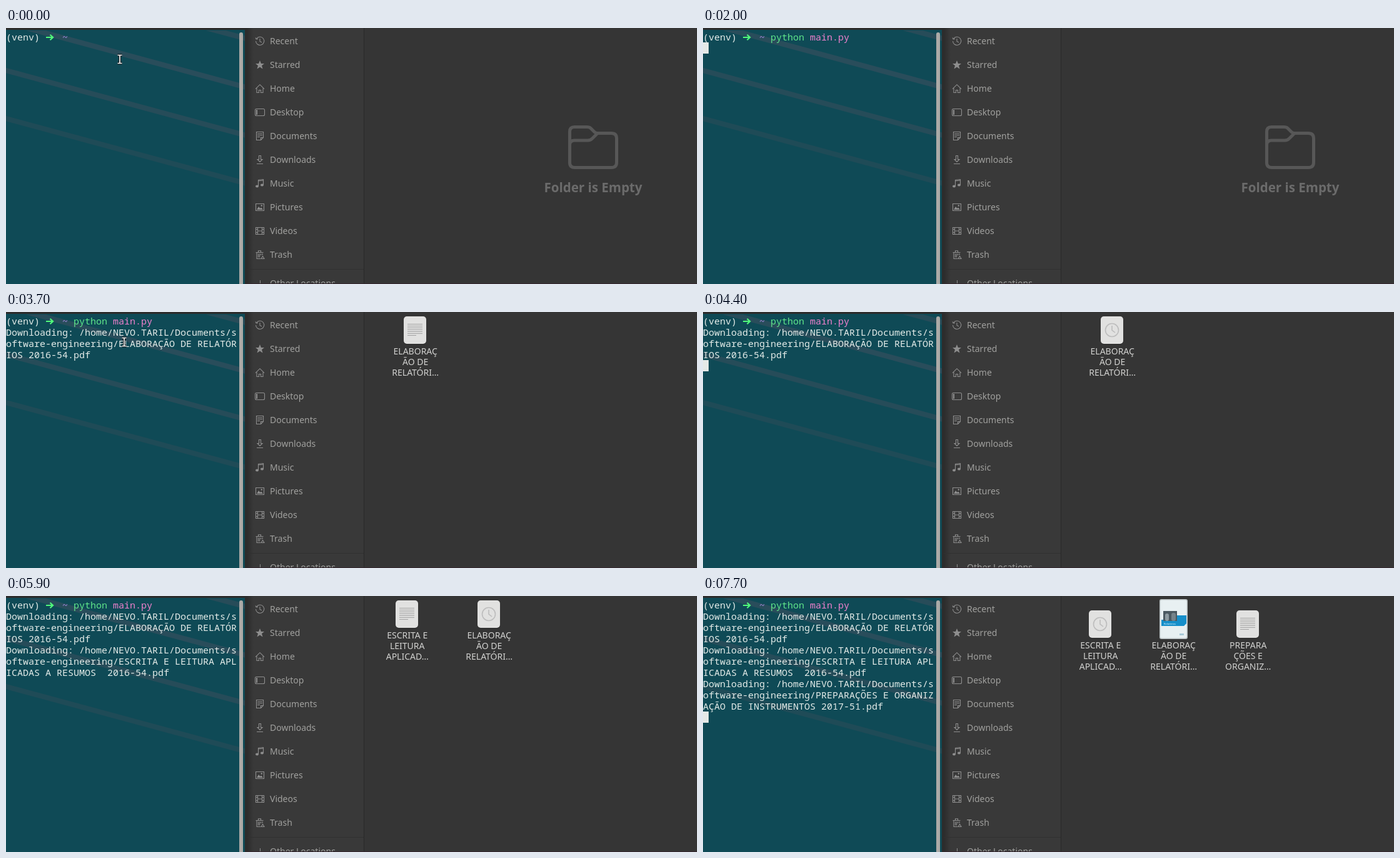
An HTML page with a canvas that plays this animation: 1105 px wide and 410 px high, repeating every 8 s.

```html
<!DOCTYPE html>
<html lang="pt">
<head>
<meta charset="utf-8">
<title>Download to folder</title>
<style>
html, body { margin: 0; width: 100%; height: 100%; overflow: hidden; background: #353535; }
canvas { display: block; }
</style>
</head>
<body>
<canvas id="stage" width="1105" height="410"></canvas>
<script>
const ctx = document.getElementById('stage').getContext('2d');
const LOOP = 8000, ROW = 18, COL = 9;
const UI = '"Noto Sans", "Open Sans", sans-serif';
const MONO = '15px "Noto Sans Mono", "DejaVu Sans Mono", monospace';
const LABEL = '#a0a09e', ICON = '#8e8e8e';

// name, stroked path, filled path on a 16px grid
const places = [
  ['Recent', 'M2.6 4.2A6.6 6.6 0 1 1 1.5 8M1 2.5l1.2 2.5 2.8-.5M8 4v4.5l3 1.6', ''],
  ['Starred', '', 'M8 1l2 5h5l-4 3.3 1.5 5.2L8 11.4l-4.5 3.1L5 9.3 1 6h5z'],
  ['Home', 'M1 8.7L8 1.7l7 7M3 7.5v7h3.5v-4h3v4H13v-7', ''],
  ['Desktop', 'M2.5 2.5h11q2 0 2 2v7q0 2-2 2h-11q-2 0-2-2v-7q0-2 2-2z', 'M2 4h2v8H2z'],
  ['Documents', 'M2.5 1.5h11v9l-4 4h-7zM4 4.5h8M4 7h8M4 9.5h4M9.5 14v-3.5h4', ''],
  ['Downloads', 'M6.5 1.5h3v6H12l-4 4-4-4h2.5zM3 14.5h10', ''],
  ['Music', 'M5.5 12V2.5l8-1V10M5.5 4l8-1', 'M1 12.5a2.4 2 0 1 0 5 0a2.4 2 0 1 0-5 0M9 10.5a2.4 2 0 1 0 5 0a2.4 2 0 1 0-5 0'],
  ['Pictures', 'M1.5 2.5h13v11h-13z', 'M3 12l3-5 2.5 3 1.5-1.5 3 3.5zM9.5 5.5a1.3 1.3 0 1 0 2.6 0a1.3 1.3 0 1 0-2.6 0'],
  ['Videos', 'M1.5 2.5h13v11h-13zM4.5 2.5v11M11.5 2.5v11M4.5 8h7M1.5 5.5h3M1.5 10.5h3M11.5 5.5h3M11.5 10.5h3', ''],
  ['Trash', 'M1.5 4.5h12M5.5 4V1.8h4V4M3 5v9.5h6M5.5 6.5v6M7.5 6.5v6M9.5 6.5v2.5M12 6v3M10 14.5l2.5-4 2.5 4z', ''],
];

const downloads = [
  { at: 2300, name: 'ELABORAÇÃO DE RELATÓRIOS 2016-54.pdf' },
  { at: 4500, name: 'ESCRITA E LEITURA APLICADAS A RESUMOS  2016-54.pdf' },
  { at: 7000, name: 'PREPARAÇÕES E ORGANIZAÇÃO DE INSTRUMENTOS 2017-51.pdf' },
];
// the terminal wraps at 41 columns
for (const d of downloads) {
  d.lines = `Downloading: /home/NEVO.TARIL/Documents/software-engineering/${d.name}`.match(/.{1,41}/g);
}

const report = ['ELABORAÇ', 'ÃO DE', 'RELATÓRI…'];
const writing = ['ESCRITA E', 'LEITURA', 'APLICAD…'];
const tools = ['PREPARA', 'ÇÕES E', 'ORGANIZ…'];

function rect(x, y, w, h, color, r = 0) {
  ctx.fillStyle = color;
  ctx.beginPath();
  ctx.roundRect(x, y, w, h, r);
  ctx.fill();
}

function text(s, x, y, color, font, align = 'left') {
  ctx.font = font;
  ctx.fillStyle = color;
  ctx.textAlign = align;
  ctx.fillText(s, x, y);
}

function stroke(d, color, width) {
  ctx.strokeStyle = color;
  ctx.lineWidth = width;
  ctx.stroke(new Path2D(d));
}

function term(s, col, row, color = '#e3ebe8') {
  text(s, col * COL, 20 + row * ROW, color, MONO);
}

function terminal(t) {
  rect(0, 0, 385, 410, '#2c2c2c');
  rect(0, 3, 382, 407, '#0f4a56');
  ctx.save();
  ctx.beginPath();
  ctx.rect(0, 4, 382, 406);
  ctx.clip();
  [[16, '#274c59'], [94, '#294d5b'], [171, '#264c59'], [248, '#1f4b57']].forEach(([y, color]) =>
    stroke(`M-20 ${y - 108.4}L400 ${y + 5.4}`, color, 8.4));
  ctx.restore();
  rect(373, 7, 6, 410, '#abaaa7', 3);

  term('(venv)', 0, 0);
  stroke('M64 15h10M70.5 10.8l4.6 4.2-4.6 4.2', '#50fa7b', 2.2);
  term('~', 10, 0, '#a48be0');
  if (t >= 700) {
    term('python', 12, 0, '#5fe58a');
    term('main.py', 19, 0, '#ee80cd');
  } else if (t >= 500) term('p', 12, 0, '#ff5555');

  const shown = downloads.filter(d => t >= d.at);
  shown.forEach((d, i) => d.lines.forEach((s, j) => term(s, 0, 1 + i * 3 + j)));

  const lit = t < 2300 ? (t >= 500 && t < 700) || t >= 1300 : Math.floor((t - 2300) / 600) % 2 === 1;
  if (lit) {
    const row = t < 2000 ? 0 : 1 + shown.length * 3;
    const col = t < 700 ? 13 : t < 2000 ? 26 : 0;
    rect(col * COL, 5 + row * ROW, COL, ROW, '#e5e9e7');
  }
}

function pointer(t) {
  let x = 182, y = 50;
  if (t >= 3700 && t < 4100) {
    const p = Math.floor((t - 3700) / 100) / 3;
    x = 189 - 175 * p * p;
    y = 48 - 28 * p;
  } else if (t >= 500) return;
  const beam = `M${x - 3.5} ${y - 6.5}h7M${x} ${y - 6.5}v13M${x - 3.5} ${y + 6.5}h7`;
  stroke(beam, '#101c20', 4);
  stroke(beam, '#f4f4f4', 1.7);
}

function sidebar() {
  rect(385, 0, 187, 410, '#393939');
  const shade = ctx.createLinearGradient(384, 0, 396, 0);
  shade.addColorStop(0, '#0004');
  shade.addColorStop(1, '#0000');
  rect(384, 0, 12, 410, shade);
  rect(572, 0, 1, 410, '#292929');
  rect(385, 386, 187, 1, '#303030');
  places.forEach(([name, line, fill], i) => {
    const y = 21 + i * 38;
    ctx.save();
    ctx.translate(398, y - 8);
    stroke(line, ICON, 1.1);
    ctx.fillStyle = ICON;
    ctx.fill(new Path2D(fill));
    ctx.restore();
    text(name, 422, y + 5, LABEL, '14px ' + UI);
  });
  stroke('M406.5 404v10', ICON, 1);
  text('Other Locations', 422, 414, LABEL, '14px ' + UI);
}

function emptyFolder(alpha) {
  ctx.globalAlpha = alpha;
  stroke('M901.5 216V166q0-7.5 7.5-7.5h20q4 0 6 2l6 6q2 2 5 2h22q8.5 0 8.5 8.5v38q0 8.5-8.5 8.5h-58q-8.5 0-8.5-7.5zM901.5 187q0-7 8-7h21q4 0 7-3l8-8', '#575757', 5);
  text('Folder is Empty', 939, 262.5, '#6b6b6b', 'bold 20.5px ' + UI, 'center');
  ctx.globalAlpha = 1;
}

function page(x, y, kind) {
  rect(x - 18, y + 1, 36, 44, '#2a2a2a', 5);
  rect(x - 18, y, 36, 44, '#e1e1e0', 5);
  if (kind === 'clock') {
    ctx.beginPath();
    ctx.arc(x, y + 22, 10.5, 0, 7);
    ctx.strokeStyle = '#bdbdbd';
    ctx.lineWidth = 1.6;
    ctx.stroke();
    stroke(`M${x} ${y + 15}v7l5 4`, '#bdbdbd', 1.6);
  } else {
    for (let i = 0; i < 7; i++) rect(x - 12, y + 12 + i * 3, i === 6 ? 14 : 24, 1, '#a2a2a2');
  }
}

function cover(x, y) {
  rect(x - 22, y, 45, 64, '#b9c0c2', 3);
  rect(x - 20.5, y + 1.5, 42, 61, '#e8f0f2', 2);
  ctx.fillStyle = '#168fca';
  ctx.fill(new Path2D(`M${x - 19} ${y + 33}h22l3-7h15v13l-4 4h-36z`));
  rect(x - 16, y + 19, 22, 16, '#4b5961');
  rect(x - 13, y + 23, 6, 12, '#8e9ba1', 3);
  rect(x - 3, y + 22, 7, 13, '#75838a', 3);
  text('Relatórios', x - 15, y + 40.5, '#e8f6fc', '4px ' + UI);
  rect(x + 10, y + 55, 7, 3, '#a9cad8');
}

function file(x, y, labelY, kind, lines) {
  if (kind === 'cover') cover(x, y);
  else page(x, y, kind);
  lines.forEach((s, i) => text(s, x + 0.7, labelY + i * 17, '#d2d2d0', '14px ' + UI, 'center'));
}

function folder(t) {
  rect(573, 0, 532, 410, '#353535');
  if (t < 2500) emptyFolder(t < 2400 ? 1 : 0.5);
  else if (t < 4700) file(654, 7, 68, t < 4400 ? 'lines' : 'clock', report);
  else if (t < 7300) {
    file(641, 7, 68, t < 7000 ? 'lines' : 'clock', writing);
    file(772, 7, 68, 'clock', report);
  } else {
    file(635, 23, 84, 'clock', writing);
    file(752, 5, 84, 'cover', report);
    file(871, 23, 84, 'lines', tools);
  }
}

function draw(t) {
  folder(t);
  sidebar();
  terminal(t);
  pointer(t);
  rect(385, 409, 720, 1, '#35272f');
}

const start = performance.now();
function frame() {
  draw((performance.now() - start) % LOOP);
  requestAnimationFrame(frame);
}
frame();
</script>
</body>
</html>
```
